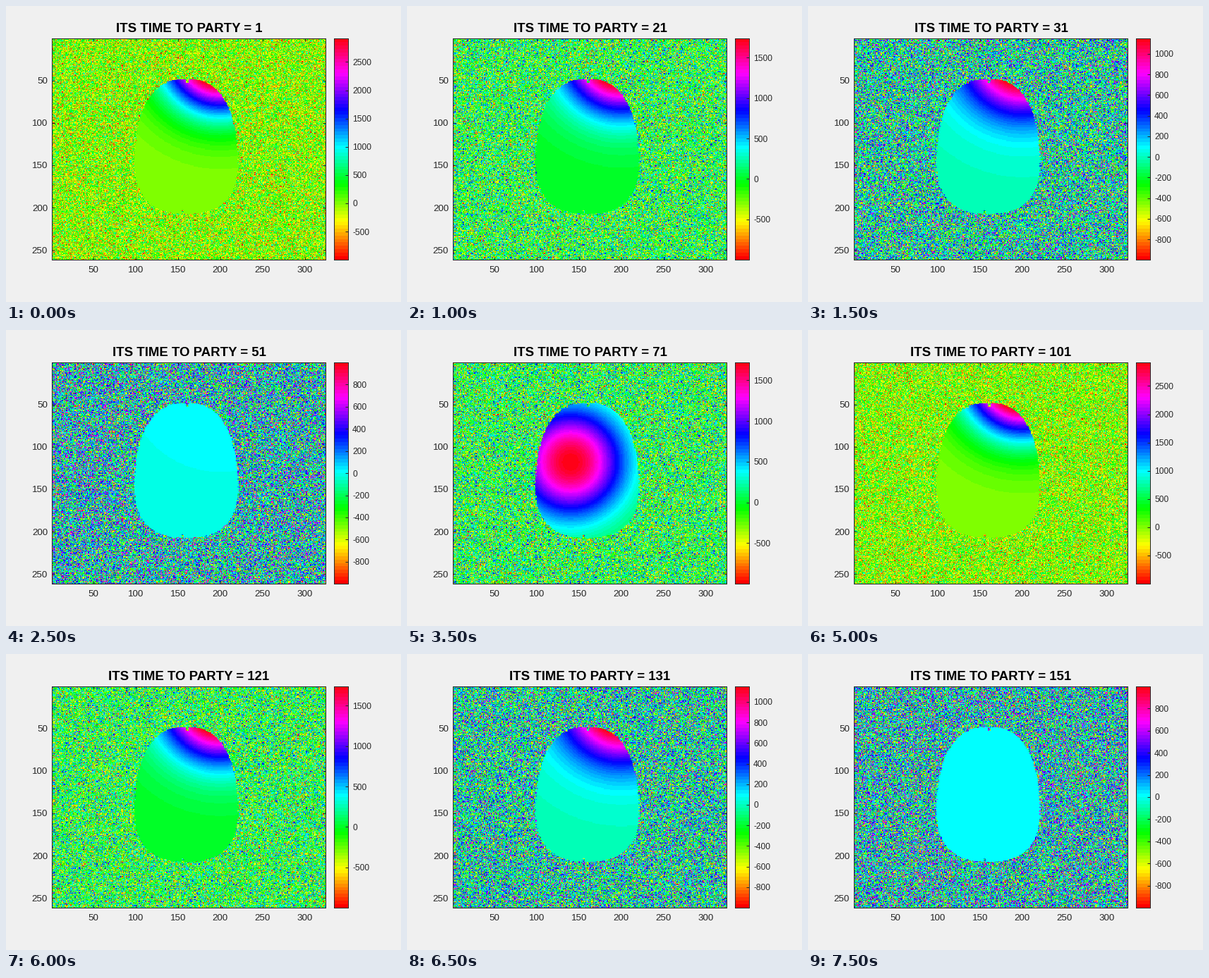
Animation of 560 by 420 pixels, one loop 8 s. Source, as a matplotlib script:

```python
import numpy as np
import matplotlib.pyplot as plt
from matplotlib.animation import FuncAnimation
from matplotlib.colors import ListedColormap, hsv_to_rgb

W, H, DPI = 560, 420, 100
ROWS, COLS = 261, 324
STEPS, INTERVAL = 16, 500
TOP, BOTTOM = 46, 360
INK = "#262626"
PEAK, RAMP, SPREAD = 4257, 49.5, 4100

plt.rcParams["font.family"] = "Liberation Sans"
LEVELS = ListedColormap([hsv_to_rgb((i / 64, 1, 1)) for i in range(64)])


def pt(px):
    return px * 72 / DPI


def add_axes(left, right):
    box = left / W, 1 - BOTTOM / H, (right - left) / W, (BOTTOM - TOP) / H
    ax = fig.add_axes(box)
    for side in ax.spines.values():
        side.set(color=INK, linewidth=pt(1))
    return ax


def style_ticks(ax, size, pad, **sides):
    ax.tick_params(direction="in", length=pt(4), width=pt(1), pad=pt(pad),
                   color=INK, labelcolor=INK, labelsize=pt(size), **sides)


def head_mask():
    """Rounded egg, wider towards the chin, with a ragged edge."""
    s = np.clip((Y - 127.7) / 79.5, -1, 1)
    half = (60.5 + 7.5 * s) * (1 - np.abs(s) ** 2.5) ** 0.4
    ragged = np.random.default_rng(4).normal(0, 0.4, X.shape)
    mask = np.abs(X - 159.6) + ragged < half
    mask[:52, 159:162] = False
    mask[203:, 154:156] = False
    return mask


def blob(cx, cy):
    return np.exp(-((X - cx) ** 2 + (Y - cy) ** 2) / SPREAD)


def activity(u):
    """Corner source fades out, then the core source builds up."""
    if u <= 50:
        return max(PEAK * (1 - u / RAMP), 10) * CORNER
    return PEAK * (u - 50) / RAMP * CORE


X, Y = np.meshgrid(np.arange(1, COLS + 1), np.arange(1, ROWS + 1))
HEAD = head_mask()
CORNER, CORE = blob(200, 17), blob(140, 118)

fig = plt.figure(figsize=(W / DPI, H / DPI), dpi=DPI, facecolor="#f0f0f0")
ax = add_axes(65, 453)
bar = add_axes(465, 485)

image = ax.imshow(np.zeros((ROWS, COLS)), cmap=LEVELS, aspect="auto",
                  interpolation="nearest", extent=(0.5, COLS + 0.5, ROWS + 0.5, 0.5))
ax.set_xticks(range(50, 301, 50))
ax.set_yticks(range(50, 251, 50))
style_ticks(ax, 13.33, 9, axis="x", top=True)
style_ticks(ax, 13.33, 6, axis="y", right=True)

scale = bar.imshow(np.arange(64)[:, None], cmap=LEVELS, aspect="auto",
                   interpolation="nearest", origin="lower")
bar.set_xticks([])
bar.yaxis.tick_right()
style_ticks(bar, 12, 6)

title = fig.text(259.5 / W, 1 - 37 / H, "", ha="center", va="baseline",
                 fontsize=pt(18.67), fontweight="bold", color="black")


def update(k):
    noise = np.random.default_rng(100 + k).triangular(-1000, 0, 1000, X.shape)
    data = np.where(HEAD, activity(10 * k % 100), noise)
    lo = -998.2 if k < 10 else -999.2
    hi = max(999.1, data[HEAD].max())

    image.set_data(data)
    image.set_clim(lo, hi)
    scale.set_extent((0, 1, lo, hi))
    bar.set_ylim(lo, hi)
    step = 200 if hi - lo < 2500 else 500
    ticks = [v for v in range(-1000, 5000, step) if lo < v < hi]
    bar.set_yticks(ticks, [str(v) for v in ticks])
    title.set_text(f"ITS TIME TO PARTY = {10 * k + 1}")
    return image, scale, title


anim = FuncAnimation(fig, update, frames=STEPS, interval=INTERVAL,
                     repeat=True, repeat_delay=0, blit=False)
plt.show()
```
